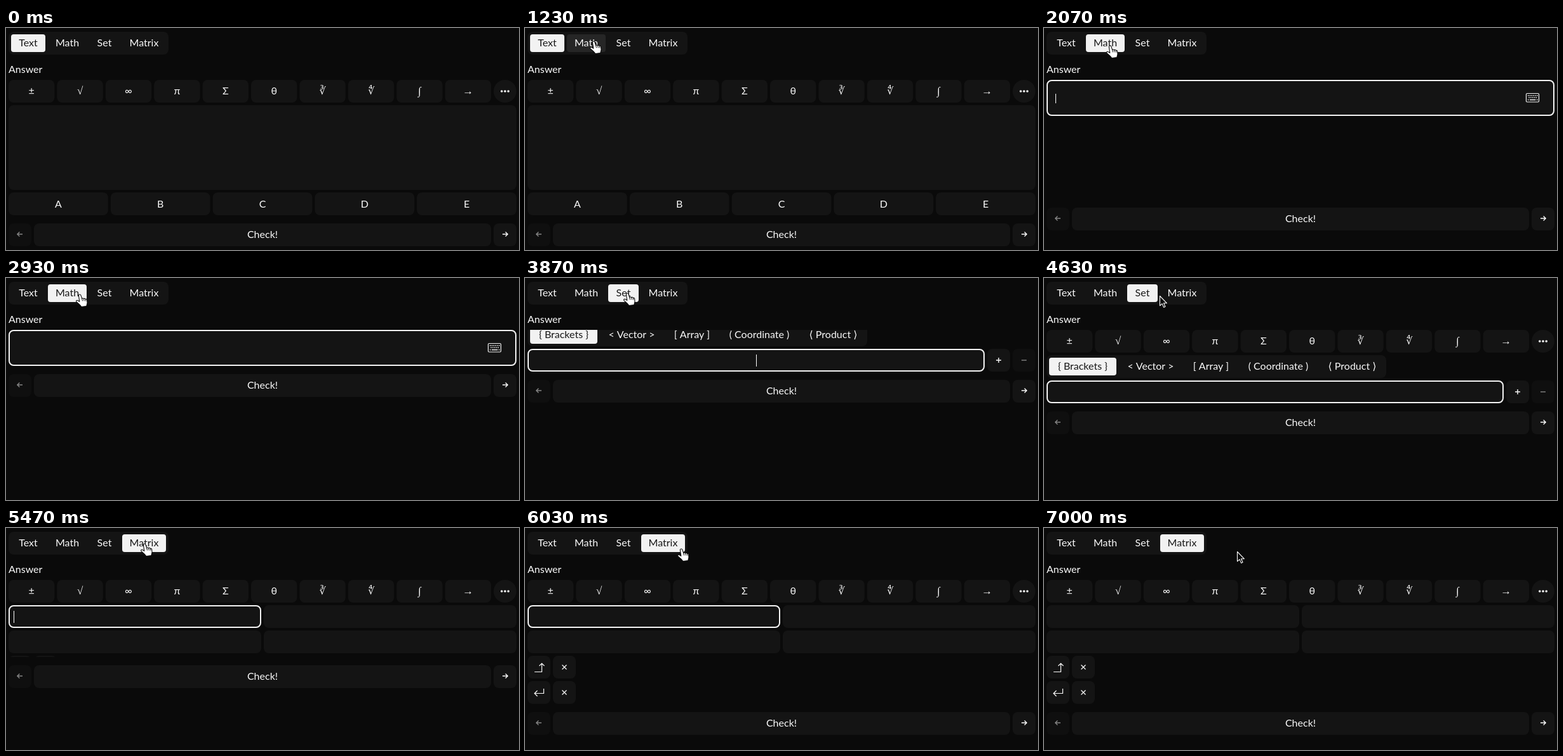
These frames come from a looping animation (808 by 351 pixels, 8.26 s). An HTML page with a canvas:

```html
<!DOCTYPE html>
<html lang="en">
<head>
<meta charset="utf-8">
<title>Answer input modes</title>
<style>
  html, body { margin: 0; width: 100%; height: 100%; overflow: hidden; background: #0a0a0a; }
  canvas { display: block; width: 808px; height: 351px; }
</style>
</head>
<body>
<canvas id="stage"></canvas>
<script>
const W = 808, H = 351, LOOP = 8260, TOP = 82;
const BG = '#0a0a0a', PANEL = '#141414', FAINT = '#0f0f0f', LIGHT = '#f2f2f2', GREY = '#858585';
const SANS = '16px Lato, "DejaVu Sans", sans-serif';
const MATH = '17px "Liberation Serif", "DejaVu Serif", serif';
const ROOT = '16px "DejaVu Sans", sans-serif';
const BLINK = 530, FADE = 150, GROW = 400, BLUR = 7000;

const canvas = document.getElementById('stage');
const ctx = canvas.getContext('2d');
const dpr = window.devicePixelRatio || 1;
canvas.width = W * dpr;
canvas.height = H * dpr;

const TABS = [
  { label: 'Text', x: 8, w: 54 },
  { label: 'Math', x: 66, w: 61 },
  { label: 'Set', x: 131, w: 48 },
  { label: 'Matrix', x: 183, w: 69 }
];

// click: tab chosen; grow: panel height starts to change
const MODES = [
  { click: -1e4, grow: -1e4, height: 214, draw: drawText },
  { click: 1900, grow: 1986, height: 57, draw: drawMath },
  { click: 3680, grow: 3786, height: 116, draw: drawSet },
  { click: 5300, grow: 5407, height: 196, draw: drawMatrix }
];

const easeIn = u => u * u;
const easeOut = u => 1 - (1 - u) * (1 - u);
const clamp = u => Math.max(0, Math.min(1, u));
const mix = (a, b, u) => a + (b - a) * u;

// cubic-bezier(.4, 0, .2, 1)
function standard(x) {
  let lo = 0, hi = 1;
  for (let i = 0; i < 24; i++) {
    const s = (lo + hi) / 2, r = 1 - s;
    if (1.2 * s * r * r + 0.6 * s * s * r + s * s * s < x) lo = s; else hi = s;
  }
  return lo * lo * (3 - 2 * lo);
}

// start, end, from, to, easing
const MOVES = [
  [1030, 1400, [125, -4], [104, 28], easeOut],
  [2730, 2930, [104, 28], [116, 26], easeIn],
  [2930, 3200, [116, 26], [161, 24], easeOut],
  [4500, 4630, [161, 24], [182, 28], easeIn],
  [4630, 4930, [182, 28], [218, 25], easeOut],
  [5800, 6070, [218, 25], [256, 36], easeIn],
  [6070, 6370, [256, 36], [304, 37], easeOut]
];

function pointer(t) {
  let pos = null;
  for (const [start, end, a, b, ease] of MOVES) {
    if (t < start) break;
    const u = ease(clamp((t - start) / (end - start)));
    pos = { x: mix(a[0], b[0], u), y: mix(a[1], b[1], u) };
  }
  return pos;
}

function box(x, y, w, h, fill = PANEL, r = 8) {
  ctx.fillStyle = fill;
  ctx.beginPath();
  ctx.roundRect(x, y, w, h, r);
  ctx.fill();
}

function ring(x, y, w, h) {
  ctx.strokeStyle = LIGHT;
  ctx.lineWidth = 2;
  ctx.beginPath();
  ctx.roundRect(x + 1, y + 1, w - 2, h - 2, 7);
  ctx.stroke();
}

function text(s, x, y, fill = '#fafafa', font = SANS, align = 'center') {
  ctx.font = font;
  ctx.textAlign = align;
  ctx.fillStyle = fill;
  ctx.fillText(s, x, y);
}

function lines(color, width, ...paths) {
  ctx.strokeStyle = color;
  ctx.lineWidth = width;
  ctx.beginPath();
  for (const path of paths) path.forEach(([x, y], i) => i ? ctx.lineTo(x, y) : ctx.moveTo(x, y));
  ctx.stroke();
}

function caret(x, y, h, on) {
  if (!on) return;
  ctx.fillStyle = '#fff';
  ctx.fillRect(x, y, 1, h);
}

function grey(level) {
  const v = Math.round(level);
  return `rgb(${v},${v},${v})`;
}

function drawTabs(t, mode, pos) {
  box(4, 6, 252, 36);
  TABS.forEach((tab, i) => {
    const u = clamp((t - MODES[mode].click) / FADE);
    const on = i === mode ? u : i === mode - 1 ? 1 - u : 0;
    const hover = tab === tabAt(pos);
    if (on > 0 || hover) box(tab.x, 10, tab.w, 28, grey(mix(hover ? 38 : 20, 242, on)), 4);
    text(tab.label, tab.x + tab.w / 2, 29, grey(mix(250, 23, on)));
  });
  text('Answer', 4, 71, '#fafafa', SANS, 'left');
}

function tabAt(pos) {
  if (!pos || pos.y < 10 || pos.y >= 38) return undefined;
  return TABS.find(tab => pos.x >= tab.x && pos.x < tab.x + tab.w);
}

const KEYS = [
  ['±', SANS], ['√', MATH], ['∞', SANS], ['π', SANS], ['Σ', SANS],
  ['θ', SANS], ['∛', ROOT], ['∜', ROOT], ['∫', MATH], ['→', MATH]
];

function drawKeys() {
  KEYS.forEach(([glyph, font], i) => {
    const x = 4 + 76.4 * i;
    box(x, 82, 72.4, 36);
    text(glyph, x + 36.2, 105, '#fafafa', font);
  });
  box(768, 82, 36, 36, PANEL, 18);
  for (const x of [780.8, 786, 791.2]) box(x - 1.8, 98.2, 3.6, 3.6, '#fafafa', 1.8);
}

function drawText() {
  drawKeys();
  box(4, 122, 800, 134);
  [...'ABCDE'].forEach((c, i) => {
    const x = 4 + 160.8 * i;
    box(x, 260, 156.8, 36);
    text(c, x + 78.4, 284);
  });
}

function drawMath(blink) {
  box(4, 82, 800, 57);
  ring(4, 82, 800, 57);
  caret(18, 104, 15, blink);
  ctx.strokeStyle = LIGHT;
  ctx.lineWidth = 1.2;
  ctx.beginPath();
  ctx.roundRect(759.5, 103.5, 20, 13.5, 1.5);
  ctx.stroke();
  ctx.fillStyle = LIGHT;
  for (let i = 0; i < 6; i++) ctx.fillRect(762 + i * 2.8, 106, 1.5, 1.5);
  for (let i = 0; i < 5; i++) ctx.fillRect(763.4 + i * 2.8, 109.2, 1.5, 1.5);
  ctx.fillRect(762, 112.8, 1.5, 1.5);
  ctx.fillRect(765, 112.8, 9.5, 1.5);
  ctx.fillRect(776, 112.8, 1.5, 1.5);
}

const SHAPES = [
  ['{ Brackets }', 61], ['< Vector >', 168], ['[ Array ]', 263],
  ['( Coordinate )', 369], ['⟨ Product ⟩', 485.5]
];

function drawSet(blink) {
  drawKeys();
  box(4, 122, 535, 36);
  box(8, 126, 106, 28, LIGHT, 4);
  SHAPES.forEach(([s, x], i) => text(s, x, 145, i ? '#fafafa' : '#171717'));
  box(4, 162, 720, 36);
  ring(4, 162, 720, 36);
  caret(364, 171, 19, blink);
  box(728, 162, 36, 36);
  box(768, 162, 36, 36, FAINT);
  lines('#fafafa', 1.4, [[742, 180], [750, 180]], [[746, 176], [746, 184]]);
  lines(GREY, 1.4, [[782, 180], [790, 180]]);
}

function drawMatrix(blink, focus) {
  drawKeys();
  for (const y of [122, 162]) for (const x of [4, 406]) box(x, y, 398, 36);
  if (focus) {
    ring(4, 122, 398, 36);
    caret(12, 131, 19, blink);
  }
  for (const y of [202, 242]) {
    box(4, y, 36, 36);
    box(44, y, 36, 36);
    lines('#fafafa', 1.3, [[58.5, y + 14.5], [65.5, y + 21.5]], [[65.5, y + 14.5], [58.5, y + 21.5]]);
  }
  lines('#fafafa', 1.2, [[15, 227.5], [26.5, 227.5], [26.5, 214]], [[22.5, 218], [26.5, 214], [30.5, 218]]);
  lines('#fafafa', 1.2, [[29.5, 254], [29.5, 261.5], [15, 261.5]], [[19.5, 257], [15, 261.5], [19.5, 266]]);
}

function arrow(x, y, dir, color) {
  lines(color, 1.4, [[x - 4 * dir, y], [x + 4 * dir, y]],
    [[x + 0.6 * dir, y - 3.6], [x + 4.2 * dir, y], [x + 0.6 * dir, y + 3.6]]);
}

function drawNav(y) {
  box(4, y, 36, 36, FAINT);
  box(44, y, 720, 36);
  box(768, y, 36, 36);
  arrow(22, y + 17, -1, GREY);
  text('Check!', 404, y + 23);
  arrow(786, y + 17, 1, '#fafafa');
}

const ARROW = new Path2D('M.5 .5V15.8L4 12.6L6.6 18.4L9 17.3L6.5 11.7H11.3Z');
const HAND = new Path2D('M-1.6 1.6C-1.6 -.2 1.2 -.6 1.8 1.2L3.6 6.6C4.4 5.6 6.2 5.8 6.6 7' +
  'C7.4 6 9 6.4 9.4 7.6C10.4 7 11.4 7.6 11.6 8.8L12 13C12 15 11 16 10.8 18.6L2.6 19.6' +
  'C1.6 17 -2.6 14.4 -5 11.6C-6.2 9.8 -4 8.6 -2.6 9.8L-.2 11.4Z');

function drawPointer(pos) {
  if (!pos) return;
  const hand = tabAt(pos);
  ctx.save();
  ctx.translate(Math.round(pos.x), Math.round(pos.y));
  ctx.lineJoin = 'round';
  ctx.lineWidth = 1.1;
  ctx.fillStyle = hand ? '#fff' : '#0a0a0a';
  ctx.strokeStyle = hand ? '#0a0a0a' : '#fff';
  ctx.fill(hand ? HAND : ARROW);
  ctx.stroke(hand ? HAND : ARROW);
  if (hand) lines('#0a0a0a', 1, [[3.6, 6.6], [4.6, 10.4]], [[6.6, 7], [7.3, 10.4]], [[9.4, 7.6], [9.8, 10.6]]);
  ctx.restore();
}

function draw(t) {
  const index = MODES.findLastIndex(m => t >= m.click);
  const mode = MODES[index];
  const before = MODES[Math.max(0, index - 1)].height;
  const height = Math.round(mix(before, mode.height, standard(clamp((t - mode.grow) / GROW))));
  const blink = Math.floor((t - mode.click) / BLINK) % 2 === 0;
  const pos = pointer(t);

  ctx.setTransform(dpr, 0, 0, dpr, 0, 0);
  ctx.fillStyle = BG;
  ctx.fillRect(0, 0, W, H);
  drawTabs(t, index, pos);

  ctx.save();
  ctx.beginPath();
  ctx.rect(0, TOP, W, height);
  ctx.clip();
  // the focused set field stays scrolled into view while its panel grows
  if (index === 2) ctx.translate(0, height - mode.height);
  mode.draw(blink, t < BLUR);
  ctx.restore();

  drawNav(TOP + height + 13);
  drawPointer(pos);
}

const origin = performance.now();
function tick() {
  draw((performance.now() - origin) % LOOP);
  requestAnimationFrame(tick);
}
tick();
</script>
</body>
</html>
```
